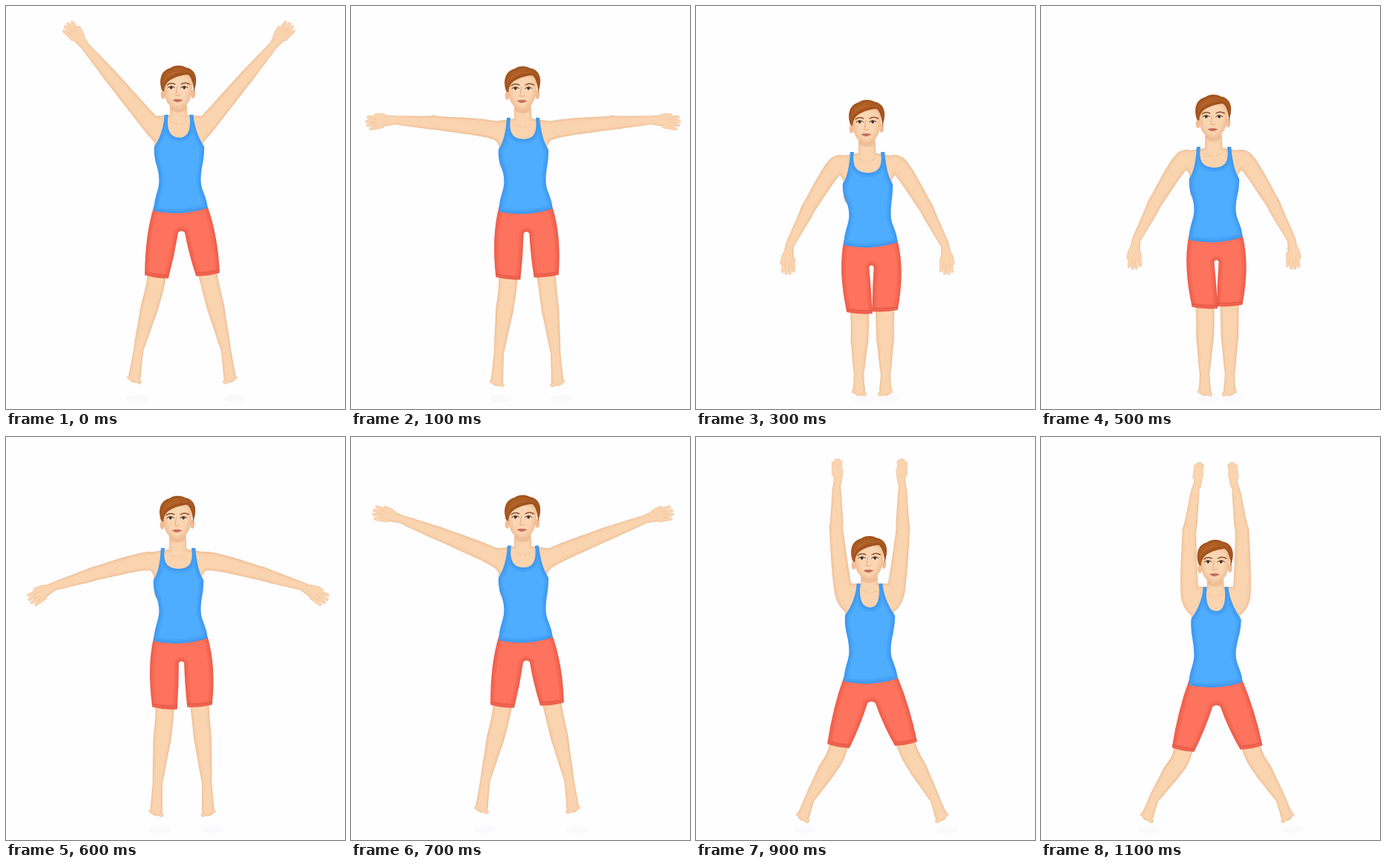
These frames come from a looping animation (455x541 px, 1200 ms). An HTML page with a canvas:

```html
<!DOCTYPE html>
<html lang="en">
<head>
<meta charset="utf-8">
<title>Jumping jacks</title>
<style>
html, body { margin: 0; width: 100%; height: 100%; overflow: hidden; background: #fefdff; }
canvas { display: block; width: 455px; height: 541px; }
</style>
</head>
<body>
<canvas id="stage"></canvas>
<script>
const W = 455, H = 541, STEP = 100, MID = 236.5;
const canvas = document.getElementById('stage');
const ctx = canvas.getContext('2d');
const dpr = window.devicePixelRatio || 1;
canvas.width = W * dpr;
canvas.height = H * dpr;

// The jump, one value per step; all joints follow from these four.
const headTop = [80, 81, 108, 126, 130, 119, 79, 78, 102, 133, 142, 138];
const raise = [140, 97, 56, 34, 26, 34, 77, 113, 148, 173, 183, 179];
const stance = [58.5, 38, 20, 18, 17, 17, 33, 56, 79.5, 84, 84.5, 85];
const sway = [232, 231, 229, 230, 231, 232, 231, 231, 232, 233, 234, 234.5];

const lerp = (a, b, k) => a + (b - a) * k;
const mix = (p, q, k) => [lerp(p[0], q[0], k), lerp(p[1], q[1], k)];

// Angles are in degrees: 0 hangs down, 180 points up.
function reach(p, side, deg, len) {
  const a = deg * Math.PI / 180;
  return [p[0] + side * len * Math.sin(a), p[1] + len * Math.cos(a)];
}

// Point a fraction along p to q, then moved sideways.
function along(p, q, k, off) {
  const dx = q[0] - p[0], dy = q[1] - p[1], len = Math.hypot(dx, dy);
  return [p[0] + dx * k - dy / len * off, p[1] + dy * k + dx / len * off];
}

function spline(a, b, c, d, u) {
  const cube = 3 * (b - c) + d - a;
  const square = 2 * a - 5 * b + 4 * c - d;
  return b + u / 2 * (c - a + u * (square + u * cube));
}

// Circles along a smooth curve through [x, y, radius] points.
function tube(...pts) {
  const out = [], n = pts.length - 1, cuts = 36;
  for (let i = 0; i < n; i++) {
    const a = pts[Math.max(i - 1, 0)], b = pts[i];
    const c = pts[i + 1], d = pts[Math.min(i + 2, n)];
    for (let j = 0; j <= cuts; j++) {
      const u = j / cuts;
      const pos = m => spline(a[m], b[m], c[m], d[m], u);
      out.push([pos(0), pos(1), lerp(b[2], c[2], u)]);
    }
  }
  return out;
}

const tones = [[0, '#edbe96'], [0.9, '#f4c9a1'], [2.2, '#f8cfa9'], [4, '#fad4af']];

function skin(tubes) {
  for (const [inset, color] of tones) {
    ctx.beginPath();
    for (const [x, y, r] of tubes.flat()) {
      const q = r - inset * Math.min(1, r / 10);
      ctx.moveTo(x + q, y);
      ctx.arc(x, y, q, 0, 7);
    }
    ctx.fillStyle = color;
    ctx.fill();
  }
}

function shape(path, fill, edge) {
  ctx.save();
  ctx.fillStyle = fill;
  ctx.fill(path);
  ctx.clip(path);
  ctx.strokeStyle = edge;
  for (const w of [12, 7, 3]) {
    ctx.lineWidth = w;
    ctx.stroke(path);
  }
  ctx.restore();
}

function line(d, color, width) {
  ctx.strokeStyle = color;
  ctx.lineWidth = width;
  ctx.stroke(new Path2D(d));
}

function ellipse(x, y, rx, ry, color) {
  ctx.fillStyle = color;
  ctx.beginPath();
  ctx.ellipse(x, y, rx, ry, 0, 0, 7);
  ctx.fill();
}

function hand(wrist, tip, side, spread) {
  const p = (k, off, r) => [...along(wrist, tip, k, -off * side), r];
  const parts = [tube([...wrist, 5.6], p(0.28, 0.5, 6.4 * spread + 0.6), p(0.5, 0, 6.8 * spread + 0.3))];
  for (let i = 0; i < 4; i++) {
    const off = (1.5 - i) * 4.1 * spread;
    const length = 0.95 - 0.035 * (i - 1.3) ** 2;
    parts.push(tube(p(0.46, off, 2.7), p(length, off * 1.3, 2)));
  }
  parts.push(tube(p(0.2, 3, 3.6), p(0.42, 8 * spread, 2.8), p(0.62, 10 * spread, 2)));
  return parts;
}

function arm(side, { cx, collar, gap, lift }) {
  const k = lift - 145;
  const rad = lift * Math.PI / 180;
  const bend = Math.max(k * 0.06, k * 0.25);
  const shoulder = [cx + side * (gap + 20.5), collar + 11 + (gap - 14) * 1.1];
  const elbow = reach(shoulder, side, lift, 70 - 8 * Math.cos(rad));
  const wrist = reach(elbow, side, lift + bend, 62);
  const tip = reach(wrist, side, lift + k * 0.28, 40);
  const spread = Math.min(1, 0.55 + 0.7 * Math.abs(Math.sin(rad)));
  return [
    tube([cx, collar + 9, 9], [...shoulder, 11.5]),
    tube([cx + side * 21, collar + 32, 12], [...shoulder, 12.5], [...elbow, 9.5],
      [...mix(elbow, wrist, 0.3), 8.8], [...wrist, 5.6]),
    tube([cx + side * 22, collar + 26, 11], [cx + side * 20, collar + 60, 12]),
    ...hand(wrist, tip, side, spread)
  ];
}

function leg(side, { bx, by, feet }, hem) {
  const hip = [bx + side * 18, by];
  const out = feet + (feet - 20) * 0.17;
  const ground = 526 - feet * 0.125;
  const full = by + Math.sqrt(234 ** 2 - (out - 18) ** 2);
  const slack = Math.max(0, full - ground);
  const toe = [MID + side * out, Math.min(full, ground)];
  const ankle = [MID + side * feet, toe[1] - Math.max(30, 46 - slack * 0.6)];
  const foot = Math.hypot(toe[0] - ankle[0], toe[1] - ankle[1]);
  const knee = mix(hip, hem, 1 + 14 / Math.hypot(hem[0] - hip[0], hem[1] - hip[1]));
  const parts = [
    tube([...mix(hip, hem, 0.85), 13], [...knee, 12.2], [...mix(knee, ankle, 0.36), 11.8], [...ankle, 6.6]),
    tube([...ankle, 6.6], [...mix(ankle, toe, 0.45), 7.4], [...mix(ankle, toe, 1 - 9 / foot), 8.4])
  ];
  for (let i = 0; i < 5; i++) {
    const p = along(ankle, toe, 1 - (2.8 + i * 0.9) / foot, side * (7 - i * 3.7));
    parts.push([[...p, 3 - i * 0.2]]);
  }
  ellipse(toe[0] + 5, 527, 15, 5, 'rgba(70,60,90,.018)');
  skin(parts);
}

function shorts({ bx, by }, hems, spread) {
  const half = 18.5 - spread * 0.08, gap = 2 + spread * 0.07;
  const bulge = 14 - spread * 0.23, tilt = spread * 0.06;
  const [l, r] = hems.map(([x, y], i) => {
    const s = i ? 1 : -1;
    const out = [x + s * half, y - tilt], inn = [x - s * half, y + tilt];
    return {
      x, y, out, inn,
      hip: [(bx + s * 36 + out[0]) / 2 + s * bulge, by + 32],
      thigh: [(bx + 1 + s * gap + inn[0]) / 2 - s * spread * 0.05, by + 58]
    };
  });
  const p = new Path2D();
  p.moveTo(bx - 36, by - 8);
  p.quadraticCurveTo(...l.hip, ...l.out);
  p.quadraticCurveTo(l.x, l.y + 2.5, ...l.inn);
  p.quadraticCurveTo(...l.thigh, bx + 1 - gap, by + 27);
  p.quadraticCurveTo(bx + 1, by + 23, bx + 1 + gap, by + 27);
  p.quadraticCurveTo(...r.thigh, ...r.inn);
  p.quadraticCurveTo(r.x, r.y + 2.5, ...r.out);
  p.quadraticCurveTo(...r.hip, bx + 36, by - 8);
  p.closePath();
  shape(p, '#fd735d', 'rgba(205,60,45,.13)');
  ctx.save();
  ctx.clip(p);
  for (const e of [l, r]) {
    line(`M${e.out[0]} ${e.out[1] - 4}Q${e.x} ${e.y - 1.5} ${e.inn[0]} ${e.inn[1] - 4}`,
      'rgba(190,60,50,.5)', 0.9);
  }
  ctx.restore();
}

function shirt({ cx, collar: c, bx, by, gap }) {
  const l = cx - gap, r = cx + gap, low = c + 42 - 0.7 * gap;
  shape(new Path2D(`M${l - 3} ${c}
    C${l - 4} ${c + 20} ${cx - 27} ${c + 34} ${cx - 33} ${c + 43}
    C${cx - 34} ${c + 65} ${bx - 29} ${by - 62} ${bx - 29} ${by - 42}
    C${bx - 29} ${by - 30} ${bx - 36} ${by - 20} ${bx - 36} ${by - 2}
    Q${bx} ${by + 6} ${bx + 36} ${by - 6}
    C${bx + 35} ${by - 22} ${bx + 27} ${by - 30} ${bx + 27} ${by - 42}
    C${bx + 27} ${by - 62} ${cx + 34} ${c + 65} ${cx + 34} ${c + 43}
    C${cx + 28} ${c + 34} ${r + 5} ${c + 20} ${r + 3} ${c}
    L${r - 2} ${c}
    C${r} ${c + 14} ${r - 1} ${low} ${cx + 1} ${low}
    C${l + 1} ${low} ${l} ${c + 14} ${l + 2} ${c}Z`),
    '#4fadff', 'rgba(25,105,205,.12)');
}

function head(x, y) {
  ctx.save();
  ctx.translate(x, y);
  ellipse(-20.5, 39, 3, 6, '#efbd94');
  ellipse(20, 38, 3, 6, '#efbd94');
  shape(new Path2D('M-19 20C-20 40-17 49-9 55.5C-3 60 3 60 8 55.5C16 49 20 38 19 20C18 5-18 5-19 20Z'),
    '#fad5b1', 'rgba(222,150,100,.13)');
  shape(new Path2D(`M-22 33C-26 20-24 7-11 3.5C-5-1 5-1 10 2.5C22 4 26 16 23 27L21 36
    C21 26 18 15 13 12C4 12-10 17-15 23C-18 27-19 30-19 35Z`), '#bb682c', 'rgba(130,60,15,.2)');
  line('M13 11C2 9-12 13-19 24M10 7C-2 5-14 9-20 18M14 9C19 14 21 20 21 28', 'rgba(145,72,25,.4)', 1);
  line('M-15 26Q-10 22-4.5 25M4 25Q9 21.5 15 25', '#86502f', 1.5);
  for (const ex of [-9.5, 8]) {
    ellipse(ex, 29.8, 3.9, 2.3, '#fff5ec');
    ellipse(ex, 29.6, 2, 2.2, '#4d3020');
    line(`M${ex - 4.4} 29.8Q${ex} 25.8 ${ex + 4.4} 29.6`, '#5d3927', 1.1);
  }
  line('M-1.5 28Q-2.5 34-3 38M-4 39.5Q-1 41.5 2.5 39.5', 'rgba(205,135,95,.6)', 1);
  ctx.fillStyle = '#d67c69';
  ctx.fill(new Path2D('M-7 46.5Q-3 43.8-1 45Q1 43.8 5.5 46.5Q-1 52-7 46.5Z'));
  line('M-7 46.5Q-1 47.8 5.5 46.5', '#a95548', 0.8);
  ctx.restore();
}

function draw(step) {
  const top = headTop[step], lift = raise[step], feet = stance[step], cx = sway[step];
  const gap = Math.min(20, 25 - lift * 0.0625);
  const collar = top + 48.5 + gap * 1.08;
  const body = { cx, collar, gap, lift, feet, bx: 234.5, by: top + 197 };
  const spread = 17 + (feet - 18) * 0.43;
  const drop = body.by + 90 - spread * 0.15;
  const hems = [[MID - spread, drop + 1.5], [MID + spread, drop - 1.5]];
  const hx = cx - 0.8;

  ctx.setTransform(dpr, 0, 0, dpr, 0, 0);
  ctx.lineCap = ctx.lineJoin = 'round';
  ctx.fillStyle = '#fefdff';
  ctx.fillRect(0, 0, W, H);

  leg(-1, body, hems[0]);
  leg(1, body, hems[1]);
  shorts(body, hems, spread);
  skin([
    ...arm(-1, body), ...arm(1, body),
    tube([cx, collar + 16, 18], [cx, collar + 45, 22]),
    tube([hx, top + 46, 11], [cx, collar + 10, 12])
  ]);
  ellipse(hx, top + 57, 10, 6, 'rgba(215,150,105,.35)');
  for (const s of [-1, 1]) {
    line(`M${cx + s * 11} ${collar + 9}Q${cx + s * 5} ${collar + 11} ${cx + s * 2} ${collar + 13}`,
      'rgba(215,150,105,.3)', 1);
  }
  shirt(body);
  head(hx, top);
}

let shown = -1;
function tick(now) {
  const step = Math.floor(now / STEP) % headTop.length;
  if (step !== shown) draw(shown = step);
  requestAnimationFrame(tick);
}
draw(0);
requestAnimationFrame(tick);
</script>
</body>
</html>
```
